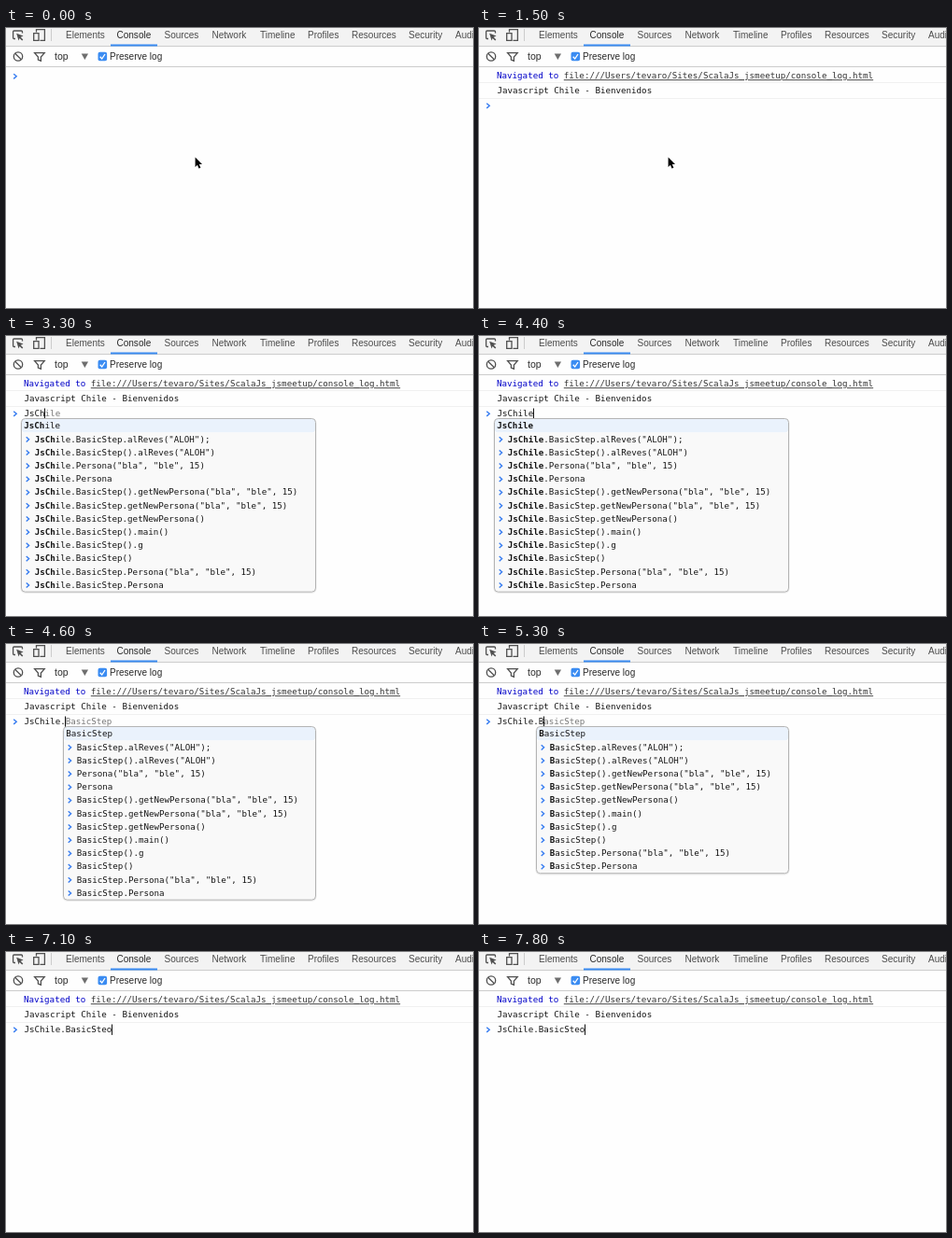
These frames come from a looping animation (500x300 px, 8000 ms). An HTML page:

```html
<!DOCTYPE html>
<html lang="es">
<head>
<meta charset="utf-8">
<title>Console autocomplete</title>
<style>
  html, body { margin: 0; width: 100%; height: 100%; overflow: hidden; background: #fefefe; }
  svg { display: block; }
  text { white-space: pre; fill: #151515; font: 9.18px "DejaVu Sans Mono", monospace; }
  .ui text { fill: #4c4c4c; font: 10.02px "Liberation Sans", Arial, sans-serif; }
  .ui .strong { fill: #2a2a2a; }
  .line { stroke: #cccccc; }
  .row { stroke: #f0f0f0; }
  .icon { fill: none; stroke: #505050; stroke-width: 1.3; }
  .chevron { fill: none; stroke: #367cf1; stroke-width: 1.4; }
  .match { font-weight: bold; }
  .hint { fill: #777; }
</style>
</head>
<body>
<svg width="500" height="300" viewBox="0 0 500 300">
  <g class="ui">
    <rect width="500" height="19" fill="#f3f3f3"/>
    <path class="line" d="M0 19.5H500M0 41.5H500M48.5 1V14"/>
    <rect x="112" y="17.5" width="50" height="2" fill="#3b8cf2"/>
    <g id="tabs"></g>

    <path class="icon" d="M10 11.5H8.6Q7.6 11.5 7.6 10.5V4Q7.6 3 8.6 3H16.5Q17.5 3 17.5 4V5.5"/>
    <path d="M11.2 5.8L18.6 8.6L15.7 9.8L18.3 12.4L17.2 13.5L14.6 10.9L13.5 13.5Z" fill="#505050"/>
    <path class="icon" d="M32.5 4.5V1.6H41.4V13.3H36.5M29.7 5.6H35V13.3H29.7Z"/>
    <circle class="icon" cx="13" cy="30.5" r="4.7"/>
    <path class="icon" d="M9.7 27.2L16.3 33.8"/>
    <path class="icon" d="M30.6 26.6H41.2L37.4 31V35.2L34.4 34V31Z"/>
    <text class="strong" x="52" y="33.8" style="font-size:10.5px">top</text>
    <path d="M80.7 27.4H88L84.35 34Z" fill="#6e6e6e"/>
    <rect x="98.5" y="25.7" width="9.6" height="9.6" rx="2" fill="#3b8cf2"/>
    <path d="M100.7 30.8L102.7 33L106 28" fill="none" stroke="#fff" stroke-width="1.3"/>
    <text class="strong" x="111" y="33.8">Preserve log</text>
  </g>

  <g id="navigation">
    <text x="19" y="54.3" style="fill:#0000c8">Navigated to <tspan fill="#333" text-decoration="underline">file:///Users/tevaro/Sites/ScalaJs_jsmeetup/console_log.html</tspan></text>
    <path class="row" d="M0 58.5H500"/>
  </g>
  <g id="log">
    <text x="19.5" y="70.3">Javascript Chile - Bienvenidos</text>
    <path class="row" d="M0 75.5H500"/>
  </g>

  <path id="pointer" d="M202.6 138.5V149L204.9 146.8L206.5 150.6L208.4 149.8L206.8 146.1H210Z"
        stroke="#fff" stroke-width="1.4" paint-order="stroke"/>

  <g id="prompt">
    <path class="chevron" d="M8.2 -2.6L11.2 0L8.2 2.6"/>
    <text id="input" x="19.5" y="2.9"></text>
    <rect id="caret" y="-5.8" width="1" height="11.4" fill="#111"/>
  </g>
  <g id="popup"></g>
</svg>
<script>
const LOOP = 8000, FIRST_KEY = 2400;
const CHAR = 5.526, TEXT_X = 19.5, ROW = 14.2, POPUP_TOP = 88.5, POPUP_RIGHT = 331.5;

const tabs = { Elements: 64, Console: 118.5, Sources: 169.5, Network: 220.5, Timeline: 272,
               Profiles: 323, Resources: 370, Security: 431, Audits: 481 };

const globals = ['JSON', 'JsChile'];
const members = ['JsChile.BasicStep'];
const history = [
  'BasicStep.alReves("ALOH");', 'BasicStep().alReves("ALOH")',
  'Persona("bla", "ble", 15)', 'Persona',
  'BasicStep().getNewPersona("bla", "ble", 15)', 'BasicStep.getNewPersona("bla", "ble", 15)',
  'BasicStep.getNewPersona()', 'BasicStep().main()', 'BasicStep().g', 'BasicStep()',
  'BasicStep.Persona("bla", "ble", 15)', 'BasicStep.Persona'
].map(entry => 'JsChile.' + entry);

// [time, input, popup delay]
const edits = [
  [-700, ''], [1000, ''],
  [FIRST_KEY, 'J', 100], [2600, 'Js'], [3000, 'JsC'], [3200, 'JsCh'], [3400, 'JsChi'],
  [3600, 'JsChil'], [3900, 'JsChile'], [4500, 'JsChile.', 100], [5300, 'JsChile.B'],
  [5500, 'JsChile.Ba'], [5800, 'JsChile.Bas'], [6000, 'JsChile.Basi'], [6200, 'JsChile.Basic'],
  [6500, 'JsChile.BasicS'], [6700, 'JsChile.BasicSt'], [6900, 'JsChile.BasicSte'],
  [7100, 'JsChile.BasicSteo'], [7200, 'JsChile.BasicSteop'], [7800, 'JsChile.BasicSteo']
];

const $ = id => document.getElementById(id);
const show = (id, on) => $(id).setAttribute('visibility', on ? 'visible' : 'hidden');

$('tabs').innerHTML = Object.entries(tabs).map(([name, x]) =>
  `<text x="${x}" y="11.2"${name === 'Console' ? ' class="strong"' : ''}>${name}</text>`).join('');

function suggestions(input) {
  const matching = list => list.filter(entry => input && entry.startsWith(input));
  return {
    names: matching(input.includes('.') ? members : globals),
    past: matching(history)
  };
}

function popupMarkup(input, { names, past }) {
  const anchor = input.lastIndexOf('.') + 1;
  const left = Math.ceil(TEXT_X - 3.5 + anchor * CHAR) + 0.5;
  const width = POPUP_RIGHT - left;
  const height = (names.length + past.length) * ROW + 1;
  const top = i => POPUP_TOP + i * ROW;
  const frame = (dy, style) =>
    `<rect x="${left}" y="${POPUP_TOP + dy}" width="${width}" height="${height}" rx="4" ${style}/>`;
  const band = (i, rows, color) =>
    `<rect x="${left + 0.5}" y="${top(i) + 0.5}" width="${width - 1}" height="${rows * ROW}" rx="3" fill="${color}"/>`;
  const rows = [...names, ...past].map((entry, i) => {
    const isPast = i >= names.length, y = top(i) + 7.6, x = left + (isPast ? 14.2 : 2.8);
    const chevron = isPast
      ? `<path class="chevron" d="M${left + 5.2} ${y - 2.1}l2.9 2.6l-2.9 2.6"/>` : '';
    return `${chevron}<text x="${x}" y="${y + 3.3}"><tspan class="match">${
      entry.slice(anchor, input.length)}</tspan>${entry.slice(input.length)}</text>`;
  });
  return frame(0.7, 'fill="none" stroke="#000" stroke-opacity=".08" stroke-width="2"')
    + frame(0, 'fill="#fff"')
    + band(names.length, past.length, '#f9f9f9')
    + band(0, 1, '#eaf2fc')
    + frame(0, 'fill="none" stroke="#b4b4b4"')
    + rows.join('');
}

let drawn;
function draw(t) {
  const [time, input, delay = 0] = edits.findLast(edit => edit[0] <= t);
  const found = suggestions(input);
  const open = found.names.length > 0 && t >= time + delay;

  show('navigation', t >= 900);
  show('log', t >= 1000);
  show('pointer', t < FIRST_KEY);
  $('prompt').setAttribute('transform', `translate(0 ${t < 900 ? 51.8 : t < 1000 ? 67.5 : 83.3})`);
  $('caret').setAttribute('x', Math.floor(TEXT_X + input.length * CHAR));
  show('caret', open || (t - time) % 1000 < 500);

  const state = input + open;
  if (state === drawn) return;
  drawn = state;
  const hint = open ? found.names[0].slice(input.length) : '';
  $('input').innerHTML = `${input}<tspan class="hint">${hint}</tspan>`;
  $('popup').innerHTML = open ? popupMarkup(input, found) : '';
}

const start = performance.now();
function tick() {
  draw((performance.now() - start) % LOOP);
  requestAnimationFrame(tick);
}
tick();
</script>
</body>
</html>
```
